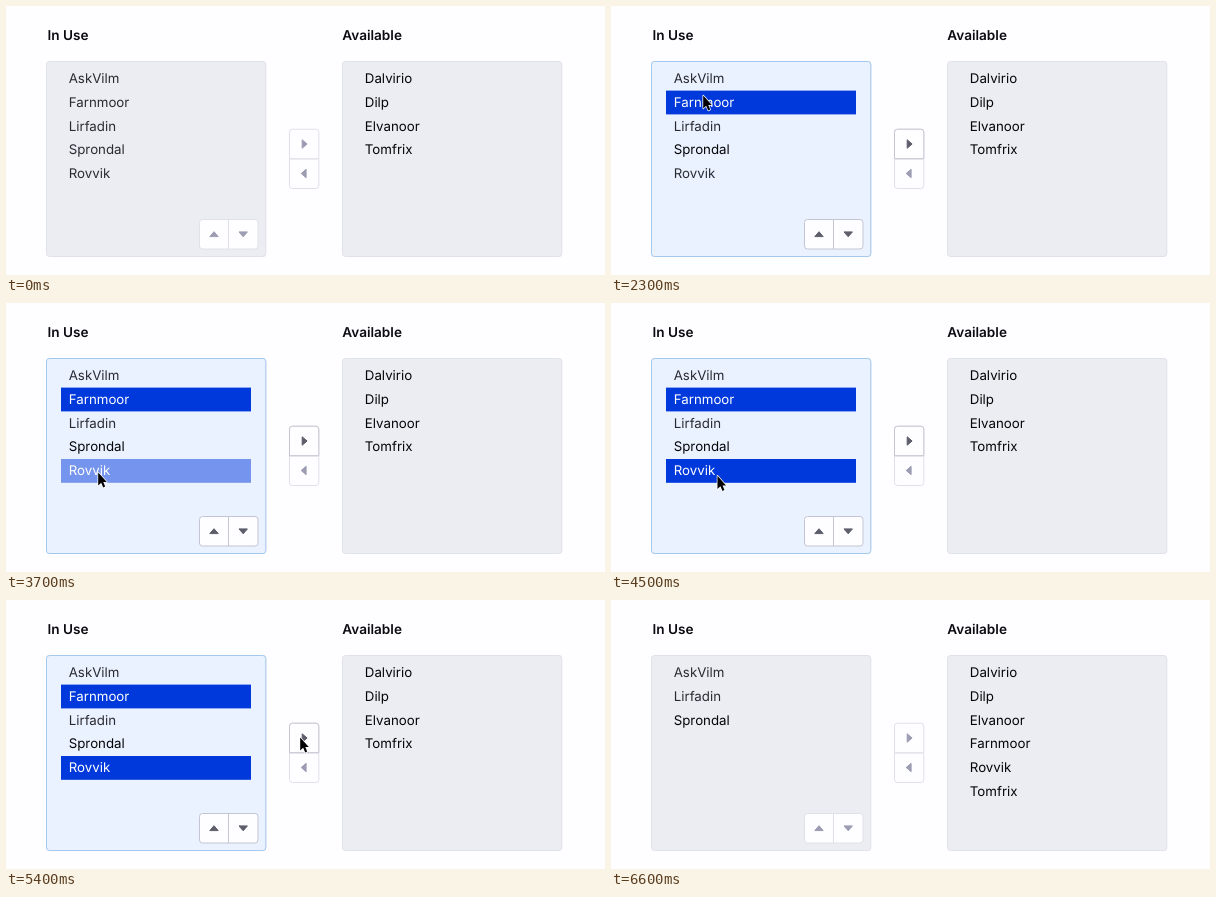
Animation of 599x269 px, one loop 8.5 s. Source, as an HTML page:

```html
<!DOCTYPE html>
<html lang="en">
<head>
<meta charset="utf-8">
<title>Dual list box</title>
<style>
  html, body { margin: 0; width: 100%; height: 100%; overflow: hidden; background: #fefdff; }
  svg { display: block; }
  text { font: 400 13.3px Inter, "Liberation Sans", sans-serif; text-rendering: geometricPrecision; }
  .label { font-size: 13.6px; font-weight: 600; fill: #0c0c10; }
  .panel { fill: #ebedf2; stroke: #e0e2e9; }
  .btn { fill: #fefdff; stroke: #e0e1e8; }
  .icon { fill: #9c9cb3; stroke: #9c9cb3; stroke-linejoin: round; }
  .on .panel { fill: #eaf2ff; stroke: #a3c9ee; }
  .on .btn { stroke: #c3c5d0; }
  .on .icon { fill: #5d5e6b; stroke: #5d5e6b; }
  .pick { fill: #0039db; }
  .soft { fill: #292a32; }
  .dark { fill: #040406; }
  .lit { fill: #fff; }
</style>
</head>
<body>
<svg width="599" height="269" viewBox="0 0 599 269">
  <defs>
    <path id="arrow" class="icon" d="M-2.5 -4.2V4.2L2.4 0Z"/>
    <rect id="panel" class="panel" y="55.5" width="219.3" height="195" rx="3"/>
    <path id="half" class="btn" d="M0 29.5V3a3 3 0 0 1 3 -3h23.3a3 3 0 0 1 3 3V29.5Z"/>
    <g id="toUse"><use href="#half" transform="matrix(1 0 0 -1 283.5 182.5)"/><use href="#arrow" transform="translate(297.6 167.5) rotate(180)"/></g>
    <g id="toFree"><use href="#half" x="283.5" y="123.2"/><use href="#arrow" x="298.7" y="138"/></g>
    <g id="order">
      <rect class="btn" x="193.5" y="213.5" width="58.5" height="29.5" rx="3"/>
      <path class="btn" d="M222.5 213.5V243"/>
      <use href="#arrow" transform="translate(208 228.1) rotate(-90)"/>
      <use href="#arrow" transform="translate(237.2 228.4) rotate(90)"/>
    </g>
  </defs>

  <text class="label" x="41.5" y="34.4">In Use</text>
  <text class="label" x="336.3" y="34.4">Available</text>
  <use href="#panel" x="40.5"/>
  <use href="#panel" x="336.5"/>
  <use href="#toUse"/>
  <g id="plain"></g>
  <g id="focus"></g>
  <g id="lists"></g>
  <path id="cursor" d="M1.2 1.4V14.6L4.2 11.8L6.2 16.5L8.2 15.6L6.3 11H9.8Z"
    fill="#000" stroke="#fff" stroke-width="1.4" paint-order="stroke" stroke-linejoin="round"/>
</svg>

<script>
const LOOP = 8500, STEP = 100, ROW = 23.8;
const FOCUS = 2200, ADD = 3700, MOVE = 5600, ENTER = 1500, LEAVE = 6600;
const $ = id => document.getElementById(id);

const used = ["AskVilm", "Farnmoor", "Lirfadin", "Sprondal", "Rovvik"];
const free = ["Dalvirio", "Dilp", "Elvanoor", "Tomfrix"];
const clicks = { Farnmoor: FOCUS, Rovvik: ADD };

// Pointer strokes: each runs from a to b, bent towards c.
const strokes = [
  { from: ENTER, to: 1900, a: [113, 202], c: [115, 140], b: [91, 88] },
  { from: 2600, to: 3200, a: [91, 88], c: [91, 128], b: [91, 168] },
  { from: 4300, to: 5400, a: [91, 168], c: [192, 195], b: [293, 136] },
  { from: 6300, to: LEAVE, a: [293, 136], c: [311, 172], b: [332, 208] }
];

const clamp = v => Math.min(1, Math.max(0, v));
const ease = u => { u **= .9; return u * u * u * (u * (6 * u - 15) + 10); };
const fade = (t, at) => clamp((t - at + STEP) / (2 * STEP));

const column = (names, x, style) => names.map((name, i) =>
  `<text class="${style(name)}" x="${x}" y="${77 + i * ROW}">${name}</text>`).join("");

function drawLists(t) {
  const moved = t >= MOVE;
  const picked = name => !moved && t >= clicks[name];
  const left = moved ? used.filter(name => !clicks[name]) : used;
  const right = moved ? [...free, ...Object.keys(clicks)].sort() : free;
  const bars = left.map((name, i) => picked(name) ?
    `<rect class="pick" x="55" y="${60.8 + i * ROW}" width="190" height="${ROW}" opacity="${fade(t, clicks[name])}"/>` : "");
  const style = name => picked(name) ? "lit" : name === "Sprondal" && t >= FOCUS ? "dark" : "soft";
  $("focus").setAttribute("opacity", moved ? 0 : fade(t, FOCUS));
  $("lists").innerHTML = bars.join("") + column(left, 62.7, style) + column(right, 358.8, () => "dark");
}

function drawCursor(t) {
  const shown = t >= ENTER && t < LEAVE;
  $("cursor").style.display = shown ? "" : "none";
  if (!shown) return;
  const { from, to, a, b, c } = strokes.filter(s => s.from <= t).pop();
  const k = ease(clamp((t - from) / (to - from)));
  const [x, y] = [0, 1].map(i =>
    a[i] * (1 - k) ** 2 + 2 * c[i] * k * (1 - k) + b[i] * k * k);
  $("cursor").setAttribute("transform", `translate(${x} ${y})`);
}

// Inlined copies so the focused colours can apply to their parts.
const controls = $("toFree").innerHTML + $("order").innerHTML;
const expand = html => html.replace(/<use href="#(\w+)"([^>]*)><\/use>/g, (_, id, place) => {
  const shape = $(id).cloneNode();
  shape.removeAttribute("id");
  const at = place.replace(/ x="([^"]+)" y="([^"]+)"/, ' transform="translate($1 $2)"');
  return `<g${at}>${shape.outerHTML}</g>`;
});
$("plain").innerHTML = expand(controls);
$("focus").innerHTML = `<g class="on"><g transform="translate(40.5 0)">${$("panel").outerHTML.replace(' id="panel"', "")}</g>${expand(controls)}</g>`;

let last;
const start = performance.now();
function frame(now) {
  const time = Math.max(0, now - start) % LOOP;
  const t = Math.floor(time / STEP) * STEP;
  if (t !== last) {
    drawLists(t);
    drawCursor(t);
    last = t;
  }
  requestAnimationFrame(frame);
}
frame(start);
</script>
</body>
</html>
```
